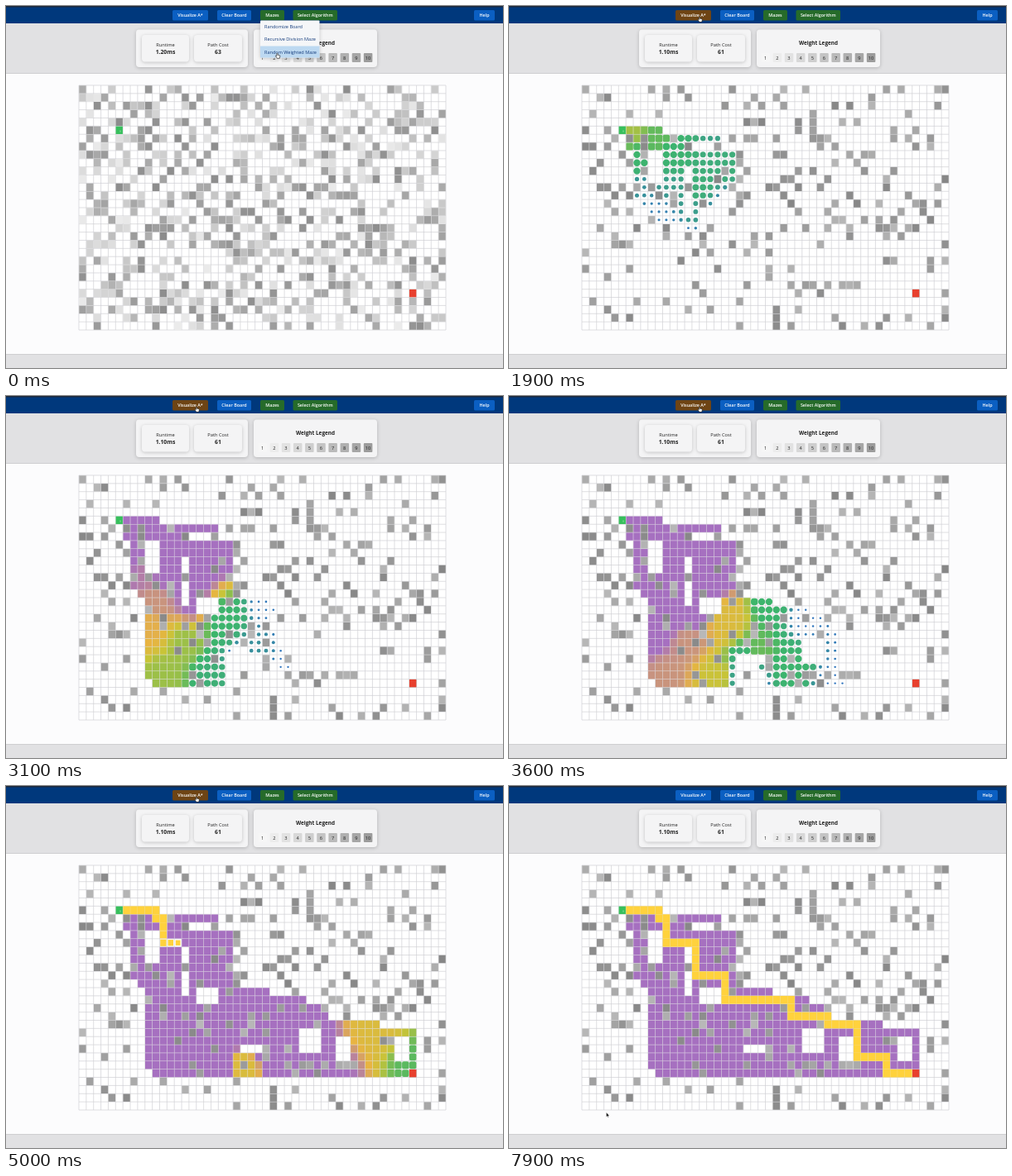
An HTML page with a canvas that plays this animation: 600x438 px, repeating every 8 s.

```html
<!DOCTYPE html>
<html lang="en">
<head>
<meta charset="utf-8">
<title>Pathfinding visualizer</title>
<style>
  html, body { margin: 0; width: 100%; height: 100%; overflow: hidden; background: #fcfcfd; }
  canvas, svg { position: absolute; left: 0; top: 0; width: 600px; height: 438px; }
  text { font: 5.7px "Open Sans", "Noto Sans", sans-serif; text-anchor: middle; fill: #222; }
  .btn text { fill: #fff; font-weight: 600; font-size: 5.4px; }
  .bold { font-weight: 700; font-size: 6.8px; }
  .menu text { fill: #133b7c; text-anchor: start; font-size: 5.55px; }
  .card { filter: drop-shadow(0 1px 2px #0003); }
</style>
</head>
<body>
<canvas id="board"></canvas>
<svg id="page" viewBox="0 0 600 438">
  <path fill="#e1e1e3" d="M0 21H600V81.5H0zM0 421.5H600V438H0z"/>
  <path stroke="#cfcfd1" d="M0 81.5H600M0 421.5H600"/>
  <path fill="#00387c" d="M0 0H600V21H0z"/>
  <path fill="#1f2a3c" d="M0 0H600V1.5H0z"/>
  <g id="buttons" class="btn"></g>
  <g fill="#f4f4f5">
    <rect class="card" x="157" y="28.5" width="135" height="45.5" rx="4"/>
    <rect class="card" x="299" y="28.5" width="149" height="45.5" rx="4"/>
    <rect class="card" x="164" y="35" width="57" height="32.5" rx="4"/>
    <rect class="card" x="227" y="35" width="58" height="32.5" rx="4"/>
  </g>
  <text x="192.5" y="49">Runtime</text>
  <text x="256" y="49">Path Cost</text>
  <text id="runtime" class="bold" x="192.5" y="58.2"></text>
  <text id="cost" class="bold" x="256" y="58.2"></text>
  <text class="bold" style="font-size:6.4px" x="373.5" y="47">Weight Legend</text>
  <g id="legend"></g>
  <g id="menu" class="menu">
    <rect class="card" x="307" y="17.5" width="71.5" height="45" rx="1" fill="#f5f6f8"/>
    <path fill="#bdd9f1" d="M307 48.5H378.5V62.5H307z"/>
    <text x="312" y="27.3">Randomize Board</text>
    <text x="312" y="42.4">Recursive Division Maze</text>
    <text x="312" y="57.6">Random Weighted Maze</text>
  </g>
  <g id="cursor" fill="#fff" stroke="#111" stroke-width=".6" stroke-linejoin="round">
    <path id="hand" d="M-.6 0V3L-1.7 2.4-2 3.2-.2 5.8H2.8L3.4 2.5 2.3 2 .6 1.8V0Q0-.7-.6 0z"/>
    <path id="arrow" fill="#111" stroke="#fff" stroke-width=".3" d="M0-1V4.4L1.2 3.3 2 5 2.8 4.6 2 3H3.6z"/>
  </g>
</svg>
<script>
const LOOP = 8000, NEW_BOARD = 250, RUN = 1080, PATH = 4420, STEP = 49, DONE = 7350, AGEING = 1400;
const COLS = 50, ROWS = 30, X0 = 88, Y0 = 96, W = 443 / COLS, H = 296 / ROWS;
const $ = id => document.getElementById(id);
const key = (c, r) => r * COLS + c;
const clamp = v => Math.max(0, Math.min(1, v));
const mix = (a, b, k) => a + (b - a) * k;
const ease = k => k * k * (3 - 2 * k);
const grey = v => `rgb(${v},${v},${v})`;

function randomizer(seed) {
  return () => (seed = (seed * 16807) % 2147483647) / 2147483647;
}

// Page furniture
const BLUE = '#0b5fc2', GREEN = '#266b2a', BROWN = '#6e4414';
const buttons = [[201, 43, 'Visualize A*', BLUE], [255, 41, 'Clear Board', BLUE],
  [307, 29, 'Mazes', GREEN], [346.5, 53.5, 'Select Algorithm', GREEN], [565, 25, 'Help', BLUE]];
$('buttons').innerHTML = buttons.map(([x, w, label, fill]) =>
  `<rect x="${x}" y="5" width="${w}" height="12.5" rx="1.5" fill="${fill}"/>
   <text x="${x + w / 2}" y="13.2">${label}</text>`).join('');
$('legend').innerHTML = Array.from({ length: 10 }, (_, i) => {
  const x = 304.5 + 14.15 * i;
  return `<rect x="${x}" y="57" width="10.5" height="11" rx="1" fill="${grey(246 - 10 * i)}"/>
   <text x="${x + 5.2}" y="64.6">${i + 1}</text>`;
}).join('');
const runButton = $('buttons').firstElementChild;

// Route from start to goal: runs along a row (H) or a column (V), end cells left out
const start = [5, 5], goal = [45, 25];
const route = [];
let [col, row] = start;
for (const [, axis, to] of 'H10V6H11V9H15V13H19V16H28V18H33V19H37V23H41V25H44'.matchAll(/([HV])(\d+)/g)) {
  while ((axis === 'H' ? col : row) < +to) {
    if (axis === 'H') col++;
    else row++;
    route.push([col, row]);
  }
}
const onRoute = new Set(route.map(p => key(...p)));

// Outline of the explored area, then its pockets, in cells
const explored = new Path2D(`M6 5H11V6H19V7H14V8H21V15H26V16H31V17H34V19H41V20H46V25H45V26H10V25H9V15H8V14H7V8H6z
  M9 8h2v4h-2zM14 10h1v6h-1zM16 15h3v2h-3zM22 22h3v1h-3zM30 20h3v3h-3zM35 21h2v3h-2zM43 21h2v3h-2z`);

// Key points (column, row, ms) of the advancing search
const front = [[6, 5, 1130], [10, 6, 1260], [7, 9, 1390], [12, 8, 1440], [18, 6, 1670], [19, 9, 1600],
  [15, 12, 1570], [15, 15, 1690], [8, 11, 1760], [12, 12, 1690], [10, 15, 1850], [9, 18, 1960],
  [11, 24, 2350], [14, 20, 2350], [19, 17, 2600], [18, 24, 2740], [24, 21, 2950], [25, 15, 3080],
  [28, 23, 3100], [30, 17, 3600], [34, 25, 3600], [40, 19, 4000], [22, 24, 4030], [45, 24, 4380]];

function visitTime(c, r) {
  let sum = 0, total = 0;
  for (const [x, y, t] of front) {
    const w = 1 / (((c - x) ** 2 + (r - y) ** 2) ** 2 + .5);
    sum += w * t;
    total += w;
  }
  return sum / total;
}

const dpr = window.devicePixelRatio || 1;
$('board').width = 600 * dpr;
$('board').height = 438 * dpr;
const ctx = $('board').getContext('2d');

function randomBoard(seed, density, light, dark) {
  const rand = randomizer(seed), board = new Map();
  for (let id = 0; id < COLS * ROWS; id++) {
    const chance = rand(), shade = rand();
    if (chance < density) board.set(id, grey(Math.round(mix(light, dark, shade))));
  }
  return board;
}
const firstBoard = randomBoard(4711, .4, 236, 140);
const secondBoard = randomBoard(2024, .16, 184, 134);
onRoute.forEach(id => secondBoard.delete(id));

const visits = [];
for (let r = 0; r < ROWS; r++) {
  for (let c = 0; c < COLS; c++) {
    const id = key(c, r);
    const reached = onRoute.has(id) || ctx.isPointInPath(explored, c + .5, r + .5, 'evenodd');
    if (reached && !secondBoard.has(id)) visits.push([c, r, visitTime(c, r)]);
  }
}
ctx.scale(dpr, dpr);

// Colours of a visited cell, evenly spaced over its ageing
const tints = [[48, 116, 190], [64, 172, 124], [60, 182, 106], [200, 196, 56], [232, 180, 66], [166, 112, 192]];
function tintAt(k) {
  const i = Math.min(tints.length - 2, Math.floor(k * (tints.length - 1)));
  const part = k * (tints.length - 1) - i;
  return `rgb(${tints[i].map((v, j) => Math.round(mix(v, tints[i + 1][j], part)))})`;
}

function cell(c, r, fill, scale = 1, round = 0) {
  const w = (W - .5) * scale, h = mix(H - .5, W - .5, round) * scale;
  ctx.fillStyle = fill;
  ctx.beginPath();
  ctx.roundRect(X0 + (c + .5) * W - w / 2, Y0 + (r + .5) * H - h / 2, w, h, round * w / 2);
  ctx.fill();
}

function drawGrid() {
  ctx.clearRect(0, 0, 600, 438);
  ctx.fillStyle = '#fff';
  ctx.fillRect(X0, Y0, COLS * W, ROWS * H);
  ctx.strokeStyle = '#d0d0d4';
  ctx.lineWidth = .7;
  ctx.beginPath();
  for (let c = 0; c <= COLS; c++) {
    ctx.moveTo(X0 + c * W, Y0);
    ctx.lineTo(X0 + c * W, Y0 + ROWS * H);
  }
  for (let r = 0; r <= ROWS; r++) {
    ctx.moveTo(X0, Y0 + r * H);
    ctx.lineTo(X0 + COLS * W, Y0 + r * H);
  }
  ctx.stroke();
}

function drawBoard(t) {
  drawGrid();
  const board = t < NEW_BOARD ? firstBoard : secondBoard;
  board.forEach((fill, id) => cell(id % COLS, Math.floor(id / COLS), fill));

  const shown = Math.max(0, Math.floor((t - PATH) / STEP) + 1);
  const covered = new Set(route.slice(0, shown).map(p => key(...p)));
  for (const [c, r, from] of visits) {
    if (t < from || covered.has(key(c, r))) continue;
    const k = clamp((t - from) / AGEING);
    cell(c, r, tintAt(k), mix(.28, 1, clamp(k / .26)), clamp((.5 - k) / .12));
  }
  route.slice(0, shown).forEach(([c, r], i) => {
    const age = t - PATH - i * STEP;
    cell(c, r, '#ffd23d', mix(.6, 1.04, clamp(age / 220)));
  });
  cell(...start, '#37bf5c');
  ctx.fillStyle = '#8ee0a0';
  ctx.fillRect(137.5, 150.5, 1, 2);
  cell(...goal, '#e8402e');
}

function drawPage(t) {
  const started = t >= RUN;
  runButton.setAttribute('fill', started && t < DONE ? BROWN : BLUE);
  $('runtime').textContent = started ? '1.10ms' : '1.20ms';
  $('cost').textContent = started ? '61' : '63';
  $('menu').style.display = t < 420 ? '' : 'none';
  const toRun = ease(clamp((t - 350) / 600)), away = ease(clamp((t - DONE) / 450));
  const x = mix(mix(327.5, 230, toRun), 117.5, away);
  const y = mix(mix(57.5, 13.5, toRun), 396, away);
  $('cursor').setAttribute('transform', `translate(${x} ${y})`);
  const pointing = toRun === 0 || (toRun > .9 && away < .02);
  $('hand').style.display = pointing ? '' : 'none';
  $('arrow').style.display = pointing ? 'none' : '';
}

function frame() {
  const t = performance.now() % LOOP;
  drawBoard(t);
  drawPage(t);
  requestAnimationFrame(frame);
}
frame();
</script>
</body>
</html>
```
